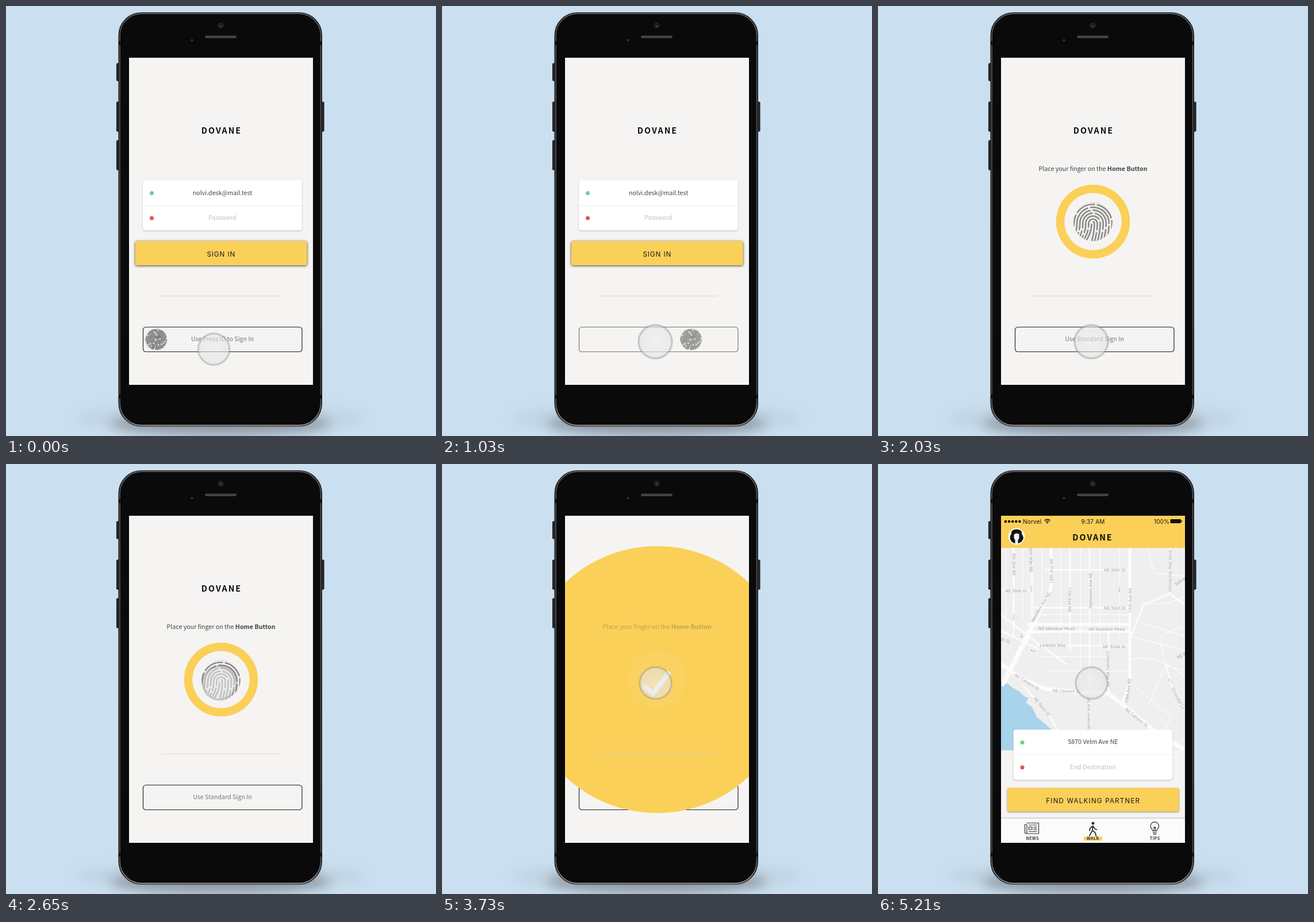
An HTML page that plays this animation: 748x748 px, repeating every 5240 ms.

```html
<!DOCTYPE html>
<html lang="en">
<head>
<meta charset="utf-8">
<title>Sign in</title>
<style>
html, body { margin: 0; width: 100%; height: 100%; overflow: hidden; background: #cadff0; }
svg { display: block; width: 100vw; height: 100vh; }
text { font: 10.65px "Noto Sans CJK JP", "Noto Sans CJK SC", "Noto Sans CJK", sans-serif; fill: #444; }
.mid { text-anchor: middle; }
.title { font-size: 14.3px; font-weight: 700; letter-spacing: 2px; fill: #0c0c0c; }
.bold { font-weight: 700; }
.hint { fill: #bdbdbd; letter-spacing: .1px; }
.soft { fill: #777; }
.btn { font: 400 11.7px Inter, sans-serif; letter-spacing: 1.15px; fill: #17171c; }
.status { font: 10px Inter, sans-serif; letter-spacing: .2px; fill: #111; }
.tab { font-size: 7.1px; font-weight: 700; letter-spacing: .5px; fill: #333; }
.street text { font: 7.6px Roboto, sans-serif; fill: #a6a6a6; letter-spacing: .2px; }
.card { fill: #fff; filter: drop-shadow(0 1px 1px rgba(0,0,0,.25)); }
.gold { fill: #fbd058; }
.line { fill: none; stroke: #333; stroke-width: 1.2; stroke-linecap: round; stroke-linejoin: round; }
.road { fill: none; stroke: #fcfcfc; stroke-linejoin: round; }

.anim { animation: 5240ms linear infinite; }
#form { animation-name: form; }
#touchText { animation-name: touchText; }
#standardText { animation-name: standardText; }
#frame { animation-name: frame; }
#print { animation-name: print; }
#ring { animation-name: ring; }
#burst { animation-name: burst; }
#hole { animation-name: hole; }
#check { animation-name: check; }
#heading { animation-name: heading; }
#home { animation-name: home; }
#homeTitle { animation-name: rise; }
#cursor { animation-name: cursor; }

@keyframes form { 0%, 21.9% { opacity: 1 } 30.5%, 100% { opacity: 0 } }
@keyframes touchText { 0%, 5% { opacity: 1 } 13.4%, 100% { opacity: 0 } }
@keyframes standardText { 0%, 30% { opacity: 0 } 38.2%, 100% { opacity: 1 } }
@keyframes frame { 0%, 8% { opacity: 1 } 19%, 30% { opacity: .6 } 38.2%, 100% { opacity: 1 } }
@keyframes print {
  0%, 10.7% { transform: translate(261.5px, 580px) scale(.545); opacity: 1; animation-timing-function: ease-in-out }
  24.5% { transform: translate(492px, 580px) scale(.545); opacity: .8; animation-timing-function: ease-in-out }
  31.5%, 53.4% { transform: translate(374px, 375px); opacity: .54 }
  58%, 100% { transform: translate(374px, 375px); opacity: 0 }
}
@keyframes ring {
  0%, 27.7% { transform: translate(374px, 375px) scale(.6); opacity: 0; animation-timing-function: ease-out }
  34.4%, 100% { transform: translate(374px, 375px); opacity: 1 }
}
@keyframes burst {
  0%, 63.7% { transform: scale(1); animation-timing-function: ease-in }
  71.2% { transform: scale(3.61) }
  74.4%, 100% { transform: scale(5.4) }
}
@keyframes hole {
  0%, 55.3% { opacity: 1 } 63.2% { opacity: .5 } 71.2% { opacity: .06 } 74.4%, 100% { opacity: 0 }
}
@keyframes check { 0%, 57.3% { opacity: 0 } 62.6%, 100% { opacity: 1 } }
@keyframes heading {
  0%, 27.7% { opacity: 0 } 36.3%, 66.8% { opacity: 1 } 71.2% { opacity: .32 } 74.4%, 100% { opacity: 0 }
}
@keyframes home { 0%, 73.5% { opacity: 0 } 78.2%, 100% { opacity: 1 } }
@keyframes rise {
  0%, 75.4% { transform: translate(0, 89px); animation-timing-function: ease }
  88.7%, 100% { transform: none }
}
@keyframes cursor {
  0% { transform: translate(361.5px, 597px) scale(.94); animation-timing-function: ease-out }
  5% { transform: translate(371px, 584px) scale(.94) }
  8%, 41.4% { transform: translate(371px, 584px); animation-timing-function: ease-in-out }
  50.6% { transform: translate(371.5px, 381px) }
  53.4%, 100% { transform: translate(371.5px, 381px) scale(.95) }
}
</style>
</head>
<body>
<svg viewBox="0 0 748 748">
  <defs>
    <linearGradient id="edge" x2="0" y2="1">
      <stop offset="0" stop-color="#5c5c5e"/><stop offset=".06" stop-color="#535355"/>
      <stop offset=".93" stop-color="#48484a"/><stop offset="1" stop-color="#98989a"/>
    </linearGradient>
    <radialGradient id="tap">
      <stop offset="0" stop-color="#ededed" stop-opacity=".6"/>
      <stop offset="1" stop-color="#e3e3e3" stop-opacity=".6"/>
    </radialGradient>
    <filter id="blur" x="-30%" y="-100%" width="160%" height="300%"><feGaussianBlur stdDeviation="10"/></filter>
    <clipPath id="screen"><path d="M214 90h320v569H214z"/></clipPath>
    <clipPath id="mapArea"><path d="M214 146h320v352H214z"/></clipPath>
    <clipPath id="round"><circle r="34"/></clipPath>
    <clipPath id="face"><circle cx="241" cy="126" r="12.5"/></clipPath>
  </defs>

  <rect width="748" height="748" fill="#cadff0"/>
  <g filter="url(#blur)" fill="#7d858c">
    <ellipse cx="373" cy="727" rx="192" ry="22" opacity=".68"/>
    <ellipse cx="373" cy="718" rx="252" ry="26" opacity=".13"/>
  </g>

  <g fill="#2b2b2d" stroke="#111" stroke-width="1">
    <rect x="192.5" y="100" width="6" height="30" rx="1"/>
    <rect x="192.5" y="167" width="6" height="51" rx="1"/>
    <rect x="192.5" y="234" width="6" height="51" rx="1"/>
    <rect x="547" y="167" width="6" height="51" rx="1"/>
  </g>
  <rect x="196.5" y="12" width="352.5" height="718.5" rx="39" fill="#0a0a0b" stroke="#19191a" stroke-width="2"/>
  <rect x="198" y="13" width="349.5" height="716.5" rx="38" fill="none" stroke="url(#edge)" stroke-width="1.8"/>
  <path d="M196 61h4v7h-4zM545.5 61h4v7h-4zM196 676h4v7h-4zM545.5 676h4v7h-4z" fill="#111"/>
  <circle cx="373.5" cy="34" r="4.8" fill="#2c2c2f"/>
  <circle cx="373.5" cy="34" r="3" fill="#0d0d10"/>
  <circle cx="373.5" cy="34.5" r="1.3" fill="#70727a"/>
  <rect x="346" y="51.5" width="55" height="4.5" rx="2.2" fill="#434345"/>
  <circle cx="323.5" cy="59.5" r="1.8" fill="#414145"/>

  <g clip-path="url(#screen)">
    <rect x="214" y="90" width="320" height="569" fill="#f5f4f2"/>
    <text class="title mid" x="375" y="222">DOVANE</text>

    <g id="form" class="anim">
      <rect class="card" x="238" y="303" width="277" height="87.5" rx="5"/>
      <path d="M238 347.5h277" stroke="#efefee"/>
      <circle cx="253.5" cy="325.5" r="3.5" fill="#6fcf8f"/>
      <circle cx="253.5" cy="369" r="3.5" fill="#d85a4e"/>
      <text class="mid" x="376.5" y="328.5">nolvi.desk@mail.test</text>
      <text class="hint mid" x="376.5" y="372.3">Password</text>
      <rect class="gold" x="225" y="409" width="298.5" height="42" rx="3" style="filter:drop-shadow(0 1px 2.2px rgba(0,0,0,.75))"/>
      <text class="btn mid" x="374.3" y="436.3" style="letter-spacing:.9px">SIGN IN</text>
    </g>

    <rect id="frame" class="anim" x="238.5" y="558.5" width="276.5" height="43" rx="5" fill="none" stroke="#202020" stroke-width="1.15"/>
    <text id="touchText" class="anim soft mid" x="376.5" y="583">Use Press ID to Sign In</text>
    <text id="standardText" class="anim soft mid" x="376.5" y="583">Use Standard Sign In</text>

    <g id="ring" class="anim">
      <circle id="burst" class="anim gold" r="64.3"/>
      <circle id="hole" class="anim" r="49.7" fill="#f5f4f2"/>
    </g>
    <path d="M271 504.5h207" stroke="#d8d7d5"/>
    <text id="heading" class="anim mid" x="374" y="286.5">Place your finger on the <tspan class="bold">Home Button</tspan></text>
    <g id="print" class="anim"><g id="ridges" clip-path="url(#round)" fill="none" stroke="#333" stroke-width="2.7" stroke-linecap="round"/></g>
    <path id="check" class="anim" d="M350 385.5L367.5 399L395.5 361.5" fill="none" stroke="#f3f2f1" stroke-width="8.5"/>

    <g id="home" class="anim">
      <rect x="214" y="90" width="320" height="569" fill="#f5f4f2"/>
      <g clip-path="url(#mapArea)">
        <rect x="214" y="146" width="320" height="352" fill="#efefef"/>
        <path d="M214 379L224 381L234 389L246 396L254 404L262 407L257 415L268 423L276 440L289 451L302 462V498H214Z" fill="#a8d3ea"/>
        <g class="road" stroke-width="1.3">
          <path d="M222 146V280M252 146V270M285 146V230M318 146V300M352 146V380M386 146V330M420 146V300"/>
          <path d="M270 262H438M280 335H400M300 360H438"/>
          <path d="M440 300L480 310L534 325M440 340Q490 330 534 370M450 390L510 440L480 498M460 240Q500 250 534 230M470 146L480 190L534 195M440 270L534 300M500 350L470 420M534 280L490 300L500 350L534 360"/>
        </g>
        <g class="road" stroke-width="2.8">
          <path d="M236 146V300M268 146V290M334 146V325M368 146V498M401 290V402M214 219H268M290 184H440M266 250H440M275 316H440M508 146V226L534 245M508 226L462 245L440 300M214 262L262 300L330 350M214 290L280 322"/>
          <path d="M500 346L512 390L534 432M252 385L300 440L330 498"/>
        </g>
        <g class="road" stroke-width="5">
          <path d="M301 146V215L262 300L216 386M438 146V380L425 418M260 279H440M256 293L300 291H440"/>
        </g>
        <path class="road" stroke-width="7" d="M214 347L250 374L290 391L350 397L400 399L425 418L478 462L534 498"/>
        <path class="road" stroke-width="8" d="M270 280L246 326L218 382"/>
        <g id="streets" class="street"></g>
        <path d="M267 212v9m-1.5-2l1.5 2l1.5-2M420 213v9m-1.5-2l1.5 2l1.5-2M236 262v8m-1.5-2l1.5 2l1.5-2M250 294v8m-1.5-2l1.5 2l1.5-2M274 326l-8-2m2 2l-2-2l2-1M512 380l-6-5m0 2v-2h2" fill="none" stroke="#aaa" stroke-width=".8"/>
      </g>

      <rect class="gold" x="214" y="90" width="320" height="56"/>
      <path d="M222 100h25" stroke="#111" stroke-width="4.6" stroke-linecap="round" stroke-dasharray="0 6.1"/>
      <text class="status" x="252" y="103.7">Norvel</text>
      <path d="M289.5 98.5Q294.5 94 299.5 98.5M291.3 100.5Q294.5 97.8 297.7 100.5" fill="none" stroke="#111" stroke-width="1.3"/>
      <path d="M292.7 101.7Q294.5 100.2 296.3 101.7L294.5 103.6Z"/>
      <text class="status mid" x="374" y="103.7">9:37 AM</text>
      <text class="status" x="480" y="103.7">100%</text>
      <rect x="508.5" y="96" width="18.5" height="7" rx="1.2" fill="#111"/>
      <path d="M528.3 98v3" stroke="#111" stroke-width="1.3"/>

      <circle cx="241" cy="126" r="14.3" fill="#fff"/>
      <g clip-path="url(#face)">
        <path d="M241 113.5C235 112 231 117 232 122C229 125 229 130 231 133L234 138H248L251.5 133C254 130 253 125 250 122C251 116 247 112.5 241 113.5Z" fill="#141414"/>
        <path d="M236.5 123Q240 119 245.5 122V128Q245 132 241 134Q237 132 236.5 128ZM238.5 133H243.5V140H238.5Z" fill="#f4f4f4"/>
      </g>

      <rect class="card" x="235.5" y="462" width="277" height="87.5" rx="5"/>
      <path d="M235.5 505.5h277" stroke="#efefee"/>
      <circle cx="251" cy="484.5" r="3.5" fill="#6fcf8f"/>
      <circle cx="251" cy="527.8" r="3.5" fill="#d85a4e"/>
      <text class="mid" x="374" y="487.3">5870 Velm Ave NE</text>
      <text class="hint mid" x="374" y="531">End Destination</text>
      <rect class="gold" x="225" y="563.5" width="298.5" height="41" rx="3" style="filter:drop-shadow(0 1px 1.5px rgba(0,0,0,.45))"/>
      <text class="btn mid" x="374.3" y="589.7">FIND WALKING PARTNER</text>

      <rect x="214" y="617" width="320" height="42" fill="#fbfbfb" style="filter:drop-shadow(0 -1px 1.5px rgba(0,0,0,.22))"/>
      <path class="line" d="M259 624.5H279.5V643H258Q255.5 643 255.5 640V627H259V640Q259 643 257.5 643M262.5 628H276M262.5 631.5H268V636H262.5ZM271 631.5H276M271 634H276M271 636.5H276M262.5 639.5H276"/>
      <circle cx="374" cy="625" r="2.5" fill="#333"/>
      <path class="line" style="stroke-width:1.9" d="M373.5 630L373 637.5L368 646.5M373 637.5L377.5 641L379.5 647M373 630L369 633.5L368 637.5M374.5 630.5L377 634.5L380.5 636"/>
      <path class="line" d="M478 638.5C478 635 474 634.5 474 630A7.3 7.3 0 0 1 488.6 630C488.6 634.5 484.6 635 484.6 638.5ZM478.3 641.3H484.3M478.8 643.8H483.8M480 638V631.5L481.3 633L482.6 631.5V638"/>
      <rect class="gold" x="358" y="648.5" width="32" height="6.5"/>
      <text class="tab mid" x="268.7" y="654.3">NEWS</text>
      <text class="tab mid" x="374" y="654.3">WALK</text>
      <text class="tab mid" x="481.7" y="654.3">TIPS</text>

      <text id="homeTitle" class="anim title mid" x="373.5" y="132.5">DOVANE</text>
    </g>

    <g id="cursor" class="anim">
      <circle r="29" fill="url(#tap)"/>
      <g fill="none" stroke="#8c8c8c">
        <circle r="29" stroke-width="4.5" stroke-opacity=".16"/>
        <circle r="29" stroke-width="1.8" stroke-opacity=".4"/>
      </g>
    </g>
  </g>
</svg>
<script>
const NS = "http://www.w3.org/2000/svg";
const add = (parent, tag, attrs) => {
  const node = document.createElementNS(NS, tag);
  for (const key in attrs) node.setAttribute(key, attrs[key]);
  return document.getElementById(parent).appendChild(node);
};

// nested arches with broken strokes
for (let i = 0; i < 8; i++) {
  const r = 2.4 + 5.1 * i;
  add("ridges", "path", {
    d: `M${-r - 12} 36Q${-r} 22 ${-r} 3A${r} ${r} 0 0 1 ${r} 3Q${r} 20 ${r - 6} 38`,
    "stroke-dasharray": `${34 + 7 * (i % 3)} 5.5`,
    "stroke-dashoffset": i * 17
  });
}

// label, centre x, centre y, rotation
const streets = [
  ["6th Ave NE", 237, 175, 90], ["dolt Way NE", 267, 167, 90],
  ["18th Ave NE", 301, 186, -90], ["17th Ave NE", 334, 236, 90],
  ["Marlowen Ave NE", 369, 220, -90], ["19th Ave NE", 438, 237, -90],
  ["NE 56th St", 412, 184, 0], ["NE 56th St", 240, 220, 0],
  ["NE 53rd St", 412, 250, 0], ["NE 52nd St", 411, 317, 0],
  ["Westfern Ave NE", 283, 249, -60], ["NE Meadow Pkwy", 311, 286, 0],
  ["NE Meadow Pkwy", 398, 287, 0], ["Larkden Way", 304, 315, 0],
  ["Collandry Way NE", 401, 357, 90], ["19th Ave NE", 435, 394, -82],
  ["Marlowen Ave NE", 366, 436, -90], ["trivel Way Northeast", 509, 186, 90],
  ["Selvan", 527, 203, -35], ["NE B", 528, 333, -28], ["th St", 222, 307, 20],
  ["Orvandel Ln", 522, 408, 62], ["NE Calvern St", 259, 379, 31],
  ["NE Calvern St", 328, 395, 2], ["NE Calvern St", 450, 441, 39],
  ["NE Reed St", 285, 422, 50]
];
for (const [label, x, y, turn] of streets) {
  add("streets", "text", {
    class: "mid", y: 2.7, transform: `translate(${x} ${y}) rotate(${turn})`
  }).textContent = label;
}
</script>
</body>
</html>
```
